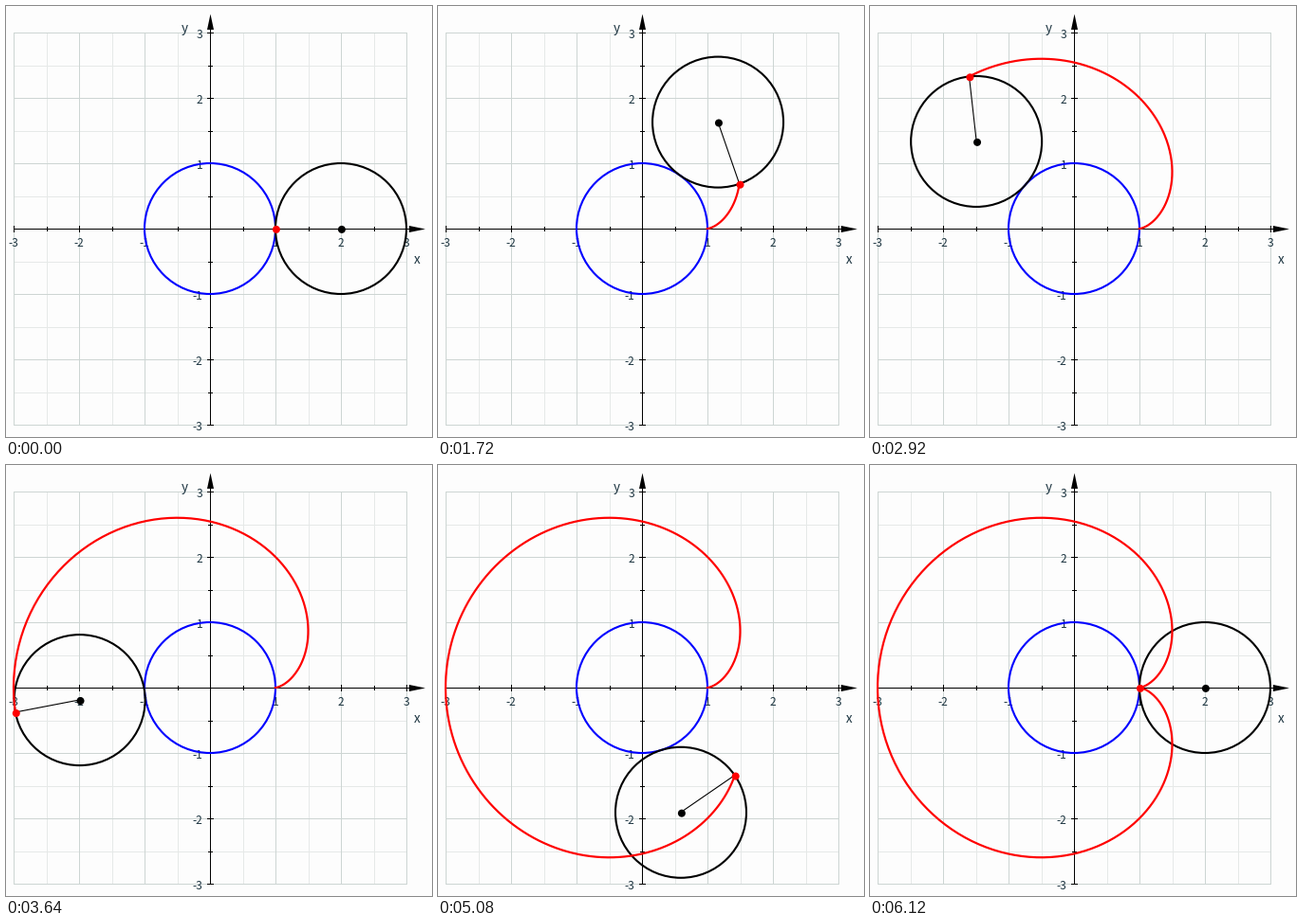
Write a matplotlib script that moves like this. It is 449 px wide and 455 px high and loops after 8120 ms.

```python
import numpy as np
import matplotlib.pyplot as plt
from matplotlib.animation import FuncAnimation
from matplotlib.patches import Circle, Polygon, Rectangle

W, H, DPI = 449, 455, 100
UNIT, OX, OY = 69, 215, 235
TICK_MS, LOOP_MS = 40, 8120
START_MS, STEP_MS, STEPS = 1000, 80, 65
SAMPLES = 99              # angle samples in one turn
PT = 72 / DPI             # points per pixel
INK = "#1c3440"

plt.rcParams["font.family"] = "Noto Sans CJK JP"
fig = plt.figure(figsize=(W / DPI, H / DPI), dpi=DPI, facecolor="#fdfdfd")
ax = fig.add_axes([0, 0, 1, 1])
ax.set_xlim(0, W)
ax.set_ylim(H, 0)
ax.axis("off")


def px(x, y):
    return OX + UNIT * x, OY - UNIT * y


def line(color, width, z):
    return ax.plot([], [], color=color, lw=width * PT, zorder=z)[0]


def bar(x, y, w, h, color, z):
    """Fill whole pixels, so that the edges stay sharp."""
    ax.add_patch(Rectangle((x, y), w, h, fc=color, ec="none", lw=0, zorder=z))


def label(x, y, text, size=12, ha="center"):
    ax.text(x, y, text, size=size * PT, color=INK, ha=ha, va="baseline", zorder=4)


def ring(x, y, color, z):
    return ax.add_patch(Circle(px(x, y), UNIT, fill=False, ec=color, lw=2.1 * PT, zorder=z))


def dot(color, z):
    return ax.add_patch(Circle((0, 0), 4, fc=color, ec="none", zorder=z))


def draw_plane():
    left, top, side = 8, 28, 415
    for i in range(-6, 7):
        gx = int(np.floor(OX + i * UNIT / 2 + 0.5))
        gy = int(np.floor(OY + i * UNIT / 2 + 0.5))
        whole = i % 2 == 0
        color, z = ("#cdd5d3", 1.1) if whole else ("#e6e9e8", 1)
        bar(gx, top, 1, side, color, z)
        bar(left, gy, side, 1, color, z)
        if i == 0:
            continue
        arm = 3 if whole else 2
        bar(gx, OY - arm, 1, 2 * arm + 1, "black", 3)
        bar(OX - arm, gy, 2 * arm + 1, 1, "black", 3)
        if whole:
            n = i // 2
            label(gx + 0.3, 254, str(n))
            label(207.5, OY - n * UNIT + 6, str(n), ha="right")

    bar(left, OY, 422, 1, "black", 3)
    bar(OX, 20, 1, 423, "black", 3)
    heads = ([(442, 235.5), (425, 232), (425, 239)],
             [(215.5, 8.5), (212, 25), (219, 25)])
    for head in heads:
        ax.add_patch(Polygon(head, fc="black", ec="none", zorder=3))
    label(433, 272.5, "x", 13.5)
    label(188.5, 28, "y", 13.5)


def curve(t):
    return px(2 * np.cos(t) - np.cos(2 * t), 2 * np.sin(t) - np.sin(2 * t))


draw_plane()
ring(0, 0, "#0000ff", 5)
wheel = ring(2, 0, "black", 6)
trace = line("#ff0000", 2.2, 7)
spoke = line("black", 1.1, 8)
hub = dot("black", 9)
pen = dot("#ff0000", 10)


def update(frame):
    elapsed = frame * TICK_MS - START_MS
    step = min(max(elapsed // STEP_MS + 1, 0), STEPS)
    t = 2 * np.pi * (step * SAMPLES // STEPS) / SAMPLES
    cx, cy = px(2 * np.cos(t), 2 * np.sin(t))
    x, y = curve(t)
    wheel.center = cx, cy
    hub.center = cx + 0.9, cy + 0.9
    pen.center = x + 0.9, y + 0.9
    spoke.set_data([cx, x], [cy - 0.2, y - 0.2])
    trace.set_data(*curve(np.linspace(0, t, 200)))
    return wheel, trace, spoke, hub, pen


anim = FuncAnimation(fig, update, frames=LOOP_MS // TICK_MS, interval=TICK_MS,
                     init_func=lambda: update(0), repeat=True, repeat_delay=0)
plt.show()
```
